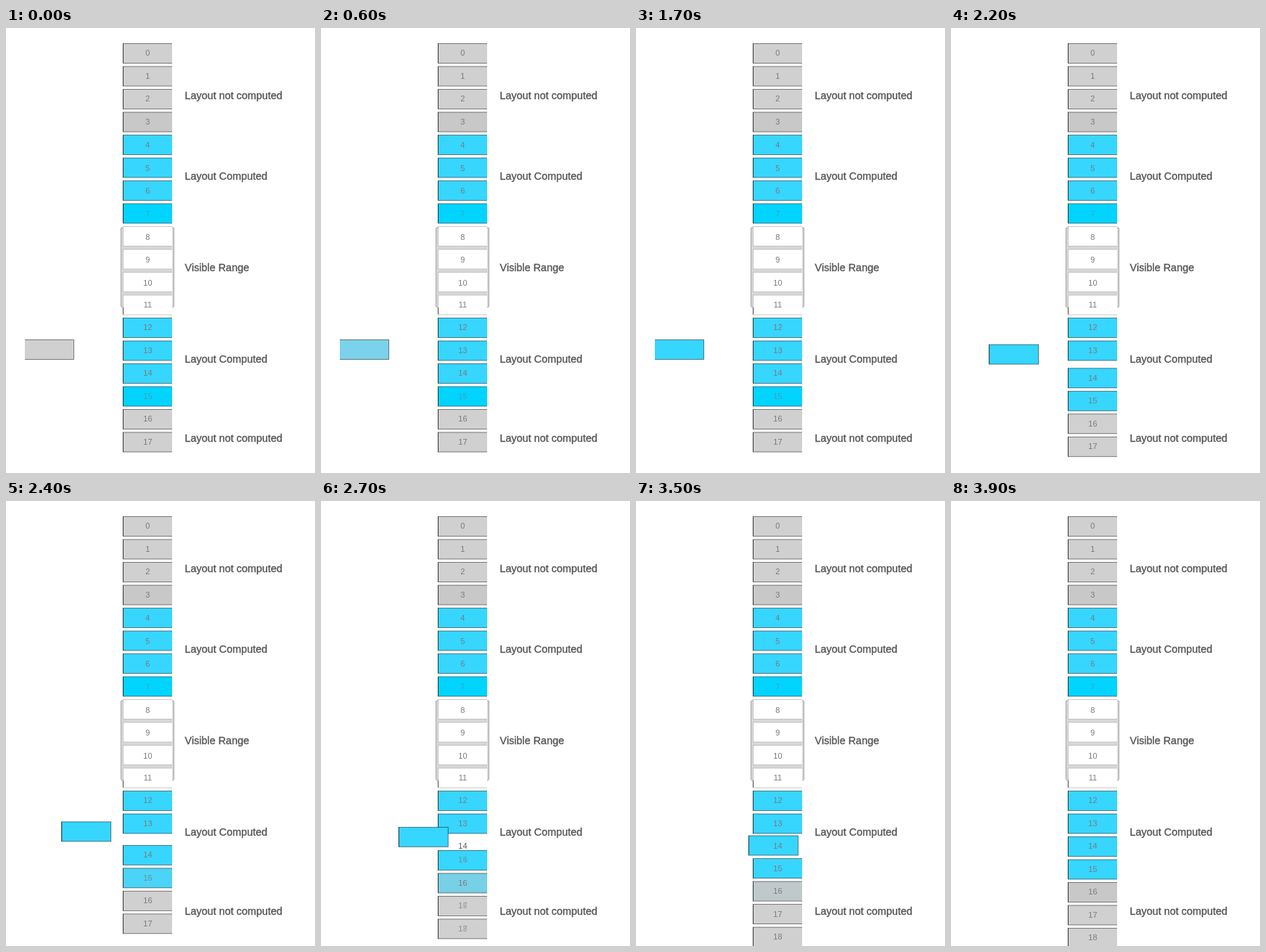
Recreate the animation shown at these times as an HTML page with a canvas. Size 426 by 613 pixels, loop 4100 ms.

```html
<!DOCTYPE html>
<html lang="en">
<head>
<meta charset="utf-8">
<title>Layout range</title>
<style>
  html, body { margin: 0; width: 100%; height: 100%; overflow: hidden; background: #fff; }
  canvas { display: block; width: 426px; height: 613px; }
</style>
</head>
<body>
<canvas id="stage"></canvas>
<script>
const W = 426, H = 613, LOOP = 4100, STEP = 100;
const BOX = { x: 161.5, y: 21.5, w: 68, h: 27, pitch: 31.5 };
const VIEW = { left: 26, right: 229 };
const FONT = '"Liberation Sans", Arial, Helvetica, sans-serif';
const GRAY = [208, 208, 208], DARK_GRAY = [200, 200, 200];
const BLUE = [54, 214, 255], DEEP_BLUE = [0, 212, 255], WHITE = [255, 255, 255];
const MUTED = '#7b7b7b', FAINT = '#4a9db2';
const INSERT_AT = 14;
const TINT_STEPS = [0, 200, 300, 400, 500, 600, 800, 900, 1200, 1300];
const CAPTIONS = [
  ['Layout not computed', 97.5],
  ['Layout Computed', 208.5],
  ['Visible Range', 335],
  ['Layout Computed', 460.5],
  ['Layout not computed', 570.3]
];

const canvas = document.getElementById('stage');
const ctx = canvas.getContext('2d');
const dpr = window.devicePixelRatio || 1;
canvas.width = W * dpr;
canvas.height = H * dpr;

const span = (t, from, to) => Math.min(1, Math.max(0, (t - from) / (to - from)));
const easeOut = u => 1 - (1 - u) * (1 - u);
const lerp = (a, b, p) => a + (b - a) * p;
const mix = (a, b, p) => a.map((v, i) => lerp(v, b[i], p));
const rgb = c => `rgb(${c.map(Math.round).join(',')})`;
const slotY = i => BOX.y + BOX.pitch * i;

function drawBox(x, y, fill) {
  const white = fill === WHITE;
  ctx.fillStyle = rgb(fill);
  ctx.fillRect(x, y, BOX.w, BOX.h);
  ctx.strokeStyle = white ? '#b8b8b8' : 'rgba(0,0,0,.6)';
  ctx.lineWidth = 0.8;
  ctx.strokeRect(x, y, BOX.w, BOX.h);
  if (!white) {
    ctx.fillStyle = 'rgba(0,0,0,.55)';
    ctx.fillRect(x - 0.5, y, 1, BOX.h);
  }
}

function drawLabel(text, baseline, alpha = 1, color = MUTED) {
  if (alpha <= 0) return;
  ctx.globalAlpha = alpha;
  ctx.font = `11px ${FONT}`;
  ctx.textAlign = 'center';
  ctx.fillStyle = color;
  ctx.fillText(text, 195.4, Math.round(baseline));
  ctx.globalAlpha = 1;
}

const labelY = boxY => boxY + 16.9;

function baseColor(i) {
  if (i < 3 || i > 15) return GRAY;
  if (i === 3) return DARK_GRAY;
  if (i === 7 || i === 15) return DEEP_BLUE;
  return i > 7 && i < 12 ? WHITE : BLUE;
}

function drawPanel() {
  ctx.beginPath();
  ctx.roundRect(158.5, 275, 73, 109.5, 1);
  ctx.fillStyle = '#d8d8d8';
  ctx.fill();
  ctx.strokeStyle = '#a4a4a4';
  ctx.lineWidth = 1;
  ctx.stroke();
}

function drawFixedBoxes() {
  for (let i = 0; i < INSERT_AT; i++) {
    drawBox(BOX.x, slotY(i), baseColor(i));
    // Numbers down to 10 are spaced a little wider than their boxes.
    const baseline = i < 11 ? 38 + 31.7 * i : labelY(slotY(i));
    drawLabel(i, baseline, 1, i === 7 ? FAINT : MUTED);
  }
  // The last visible box sticks out below the panel.
  ctx.fillStyle = '#444';
  ctx.fillRect(161, 385, 1, 9.5);
}

function drawShiftingBoxes(t, moved) {
  for (let i = INSERT_AT; i < 18; i++) {
    const y = slotY(i + moved), last = i === 15;
    let fill = baseColor(i);
    if (last && t >= 2100) {
      fill = mix(BLUE, DARK_GRAY, easeOut(span(t, 2280, 3900)));
    }
    const swap = last ? span(t, 2250, 2650) : span(t, 2400, 3000);
    drawBox(BOX.x, y, fill);
    drawLabel(i, labelY(y), 1 - swap, last && t < 2100 ? FAINT : MUTED);
    drawLabel(i + 1, labelY(y), swap);
  }
}

function drawNewBox(t, moved) {
  const held = TINT_STEPS.filter(s => s <= t).pop();
  const tint = held >= 1300 ? 1 : easeOut(span(held, 100, 1600));
  const x = lerp(25.5, BOX.x, moved);
  const y = lerp(429.5, slotY(INSERT_AT), moved);
  const shown = span(t, 2400, 2800);
  const baseline = labelY(slotY(INSERT_AT));

  drawLabel(INSERT_AT, baseline, shown, '#222');
  drawBox(x, y, mix(GRAY, BLUE, tint));
  // Where the box covers the number, it shows in the muted tone.
  ctx.save();
  ctx.beginPath();
  ctx.rect(x, y, BOX.w, BOX.h);
  ctx.clip();
  drawLabel(INSERT_AT, baseline, shown);
  ctx.restore();
}

function drawCaptions() {
  ctx.font = `14.4px ${FONT}`;
  ctx.textAlign = 'left';
  ctx.fillStyle = '#555';
  ctx.strokeStyle = '#555';
  ctx.lineWidth = 0.35;
  for (const [text, y] of CAPTIONS) {
    ctx.fillText(text, 246.6, y);
    ctx.strokeText(text, 246.6, y);
  }
}

function render(t) {
  ctx.setTransform(dpr, 0, 0, dpr, 0, 0);
  ctx.fillStyle = '#fff';
  ctx.fillRect(0, 0, W, H);
  const moved = easeOut(span(t, 2000, 3900));
  drawPanel();
  drawCaptions();
  // The outer edges of the boxes are cut off by the view.
  ctx.save();
  ctx.beginPath();
  ctx.rect(VIEW.left, 0, VIEW.right - VIEW.left, H);
  ctx.clip();
  drawFixedBoxes();
  drawShiftingBoxes(t, moved);
  drawNewBox(t, moved);
  ctx.restore();
}

const start = performance.now();
function tick() {
  const t = (performance.now() - start) % LOOP;
  render(Math.floor(t / STEP) * STEP);
  requestAnimationFrame(tick);
}
tick();
</script>
</body>
</html>
```
